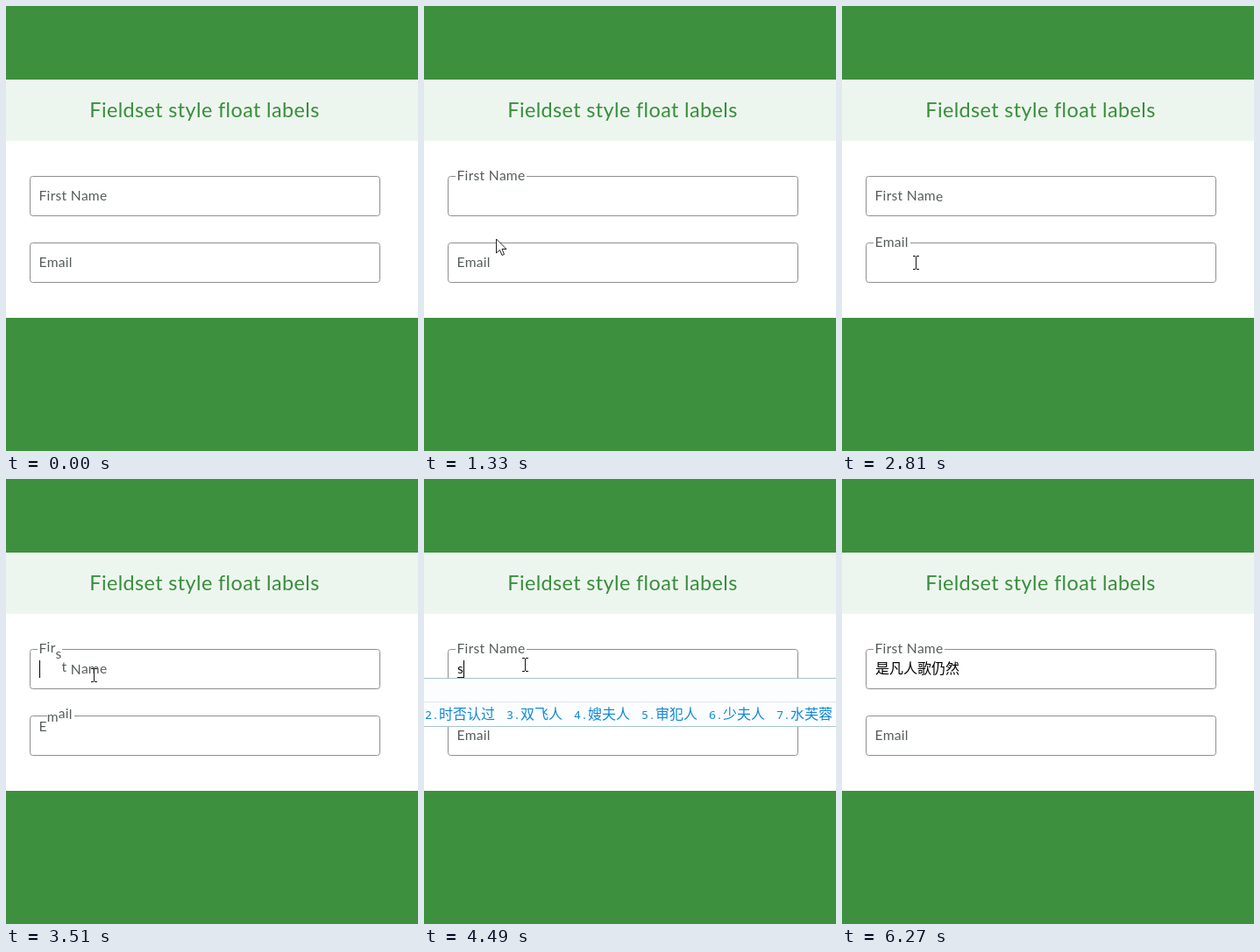
Write an HTML page with a canvas that moves like this. It is 470 px wide and 508 px high and loops after 6390 ms.

```html
<!DOCTYPE html>
<html lang="en">
<head>
<meta charset="utf-8">
<title>Fieldset style float labels</title>
<style>
html, body { margin: 0; width: 100%; height: 100%; overflow: hidden; background: #3d903d; }
canvas { display: block; }
</style>
</head>
<body>
<canvas id="stage" width="470" height="508"></canvas>
<script>
const ctx = document.getElementById('stage').getContext('2d');
const LOOP = 6390;
const GREEN = '#3d903d', LINE = '#8f8f8f', LABEL = '#555d58', INK = '#151515';
const LATIN = 'Lato, "Open Sans", sans-serif';
const CJK = '"Noto Sans CJK SC", "Noto Sans CJK", sans-serif';

// Letters move one after another, with a little wind-up and overshoot.
const RISE = { step: 45, span: 300 }, DROP = { step: 50, span: 470 };
const FIELDS = [
  { text: 'First Name', top: 194, moves: [[620, 1], [1940, 0], [3216, 1]] },
  { text: 'Email', top: 270, moves: [[1939, 1], [3280, 0]] }
];

// time, x, y of the pointer
const PATH = [
  [50, 225, 341], [480, 92, 211], [860, 92, 211], [1300, 82, 266], [1480, 82, 268],
  [1890, 83, 300], [2740, 83, 300], [3130, 100, 224], [4030, 100, 224],
  [4220, 108, 215], [4360, 115, 212], [4780, 115, 212], [5040, 137, 218],
  [5250, 152, 242], [5530, 302, 502]
];
const POINTER_END = 5560;

const TYPE_AT = 4360, POPUP_AT = 4410, COMMIT_AT = 4990;
const TYPED = '是凡人歌仍然';
const CHOICES = ['时否认过', '双飞人', '嫂夫人', '审犯人', '少夫人', '水芙蓉'];

// time span and place of the focused caret
const FOCUS = [
  [620, 1940, 38, 207], [1940, 3216, 38, 283], [3216, TYPE_AT, 38, 207],
  [TYPE_AT, COMMIT_AT, 45, 207], [5030, 6270, 134, 207]
];
const BLINK = 525;

const bez = (a, b, s) => 3 * a * s * (1 - s) ** 2 + 3 * b * s * s * (1 - s) + s ** 3;

function inOutBack(p) {
  if (p <= 0) return 0;
  if (p >= 1) return 1;
  let lo = 0, hi = 1;
  for (let i = 0; i < 24; i++) {
    const mid = (lo + hi) / 2;
    if (bez(0.68, 0.265, mid) < p) lo = mid; else hi = mid;
  }
  return bez(-0.55, 1.55, lo);
}

function rect(x, y, w, h, color) {
  ctx.fillStyle = color;
  ctx.fillRect(x, y, w, h);
}

function write(text, x, y, font, color) {
  ctx.font = font;
  ctx.fillStyle = color;
  ctx.fillText(text, x, y);
}

function lift(field, i, t) {
  const move = field.moves.filter(m => m[0] <= t).pop();
  if (!move) return 0;
  const [start, up] = move, kind = up ? RISE : DROP;
  const e = inOutBack((t - start - i * kind.step) / kind.span);
  return up ? e : 1 - e;
}

function drawField(field, t) {
  ctx.strokeStyle = LINE;
  ctx.lineWidth = 1;
  ctx.beginPath();
  ctx.roundRect(27.5, field.top + 0.5, 399, 45, 3);
  ctx.stroke();

  const font = '15.6px ' + LATIN, last = field.text.length - 1;
  ctx.font = font;
  ctx.letterSpacing = '0.3px';
  const edge = n => 37.5 + ctx.measureText(field.text.slice(0, n)).width;
  const glyphs = [...field.text].map((ch, i) => ({
    ch, x: edge(i), end: edge(i + 1), y: field.top + 28 - 23 * lift(field, i, t)
  }));
  ctx.letterSpacing = '0px';
  // each letter carries its own patch of white, which opens the border
  glyphs.forEach((g, i) => {
    const x = Math.round(g.x) - (i ? 0 : 2);
    const end = Math.round(g.end) + (i === last ? 2 : 0);
    rect(x, Math.round(g.y) - 15, end - x, 20, '#fff');
  });
  glyphs.forEach(g => write(g.ch, g.x, g.y, font, LABEL));
}

function drawTyped(t) {
  if (t >= COMMIT_AT) write(TYPED, 38, 222, '300 16px ' + CJK, '#000');
  else if (t >= TYPE_AT) {
    write('s', 38, 222, '16px ' + LATIN, INK);
    rect(38, 226, 7, 1, INK);
  }
}

function drawCaret(t) {
  const spot = FOCUS.find(f => t >= f[0] && t < f[1]);
  if (!spot) return;
  const [start, , x, y] = spot;
  if (Math.floor((t - start) / BLINK) % 2 === 0) rect(x, y, 1, 20, '#000');
}

function drawPopup(t) {
  if (t < POPUP_AT || t >= COMMIT_AT) return;
  rect(0, 227, 470, 56, '#fcfdfe');
  rect(0, 227, 470, 1, '#a9c3d3');
  rect(0, 254, 470, 1, '#dce6ec');
  rect(0, 282, 470, 1, '#a9c3d3');
  CHOICES.forEach((word, i) => {
    const x = i ? 17 + 77 * i : 1, blue = '#0c88d8';
    write(i + 2 + '.', x, 274, '300 13.3px "Noto Sans Mono", monospace', blue);
    write(word, x + 16, 274, '300 16px ' + CJK, blue);
  });
}

function pointerAt(t) {
  const i = PATH.findIndex(p => p[0] > t);
  if (i < 0) return PATH[PATH.length - 1].slice(1);
  const [t0, x0, y0] = PATH[i - 1], [t1, x1, y1] = PATH[i];
  const p = (t - t0) / (t1 - t0);
  const e = i > PATH.length - 3 ? p : p * p * (3 - 2 * p);
  return [x0 + (x1 - x0) * e, y0 + (y1 - y0) * e].map(Math.round);
}

function drawPointer(t) {
  if (t < 50 || t >= POINTER_END) return;
  const [x, y] = pointerAt(t);
  if (FIELDS.some(f => y >= f.top && y < f.top + 46)) {
    rect(x, y - 7, 1, 14, INK);
    for (const dy of [-8, 7]) {
      rect(x - 3, y + dy, 3, 1, INK);
      rect(x + 1, y + dy, 3, 1, INK);
    }
    return;
  }
  ctx.beginPath();
  [[0, 0], [0, 16], [4, 12.5], [6.5, 18.5], [9, 17.5], [6.5, 11.5], [11.5, 11.5]]
    .forEach(([dx, dy]) => ctx.lineTo(x + dx + 0.5, y + dy));
  ctx.closePath();
  ctx.fillStyle = '#fff';
  ctx.fill();
  ctx.strokeStyle = '#222';
  ctx.lineWidth = 1;
  ctx.stroke();
}

function drawTitle() {
  ctx.textAlign = 'center';
  ctx.letterSpacing = '0.38px';
  write('Fieldset style float labels', 226.5, 127, '23.4px ' + LATIN, '#388e3c');
  ctx.letterSpacing = '0px';
  ctx.textAlign = 'left';
}

function draw(t) {
  rect(0, 0, 470, 508, GREEN);
  rect(0, 84, 470, 70, '#edf6ee');
  rect(0, 154, 470, 202, '#fff');
  drawTitle();
  FIELDS.forEach(f => drawField(f, t));
  drawTyped(t);
  drawCaret(t);
  drawPopup(t);
  drawPointer(t);
}

const begin = performance.now();
function tick() {
  draw((performance.now() - begin) % LOOP);
  requestAnimationFrame(tick);
}
tick();
</script>
</body>
</html>
```
